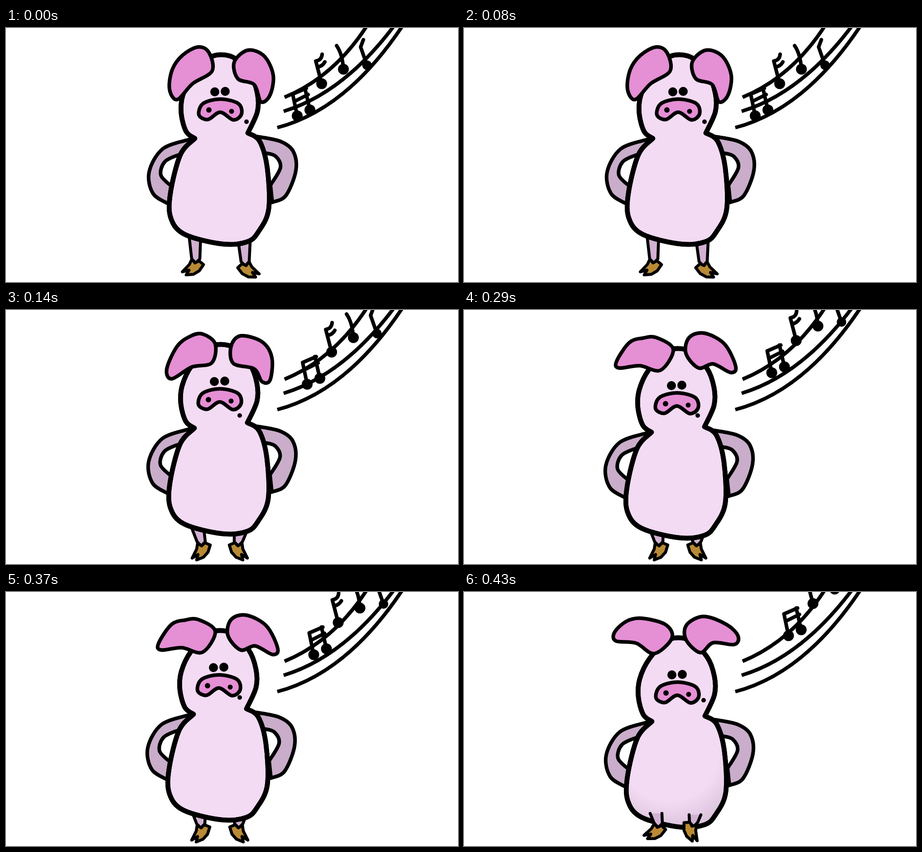
Recreate the animation shown at these times as an HTML page. Size 998 by 561 pixels, loop 570 ms.

```html
<!DOCTYPE html>
<html lang="en">
<head>
<meta charset="utf-8">
<title>Dancing pig</title>
<style>
html, body { margin: 0; width: 100%; height: 100%; overflow: hidden; background: #fff; }
svg { display: block; width: 100%; height: 100%; }
.ink { stroke: #000; stroke-width: 8; stroke-linejoin: round; stroke-linecap: round; }
.line { fill: none; }
.staff { stroke-linecap: butt; }
.pink { fill: #e58fd5; }
.skin { fill: #f3dbf3; }
.bold { stroke-width: 10.5; }
.arm { fill: #c9adca; }
.leg { fill: #d2b1d3; stroke-width: 6.5; }
.hoof { fill: #b98a35; stroke-width: 6.5; }
</style>
</head>
<body>
<svg id="stage" viewBox="0 0 998 561" preserveAspectRatio="none">
  <defs>
    <radialGradient id="shade" gradientUnits="userSpaceOnUse" cx="455" cy="310" r="170">
      <stop offset=".65" stop-color="#dcc4dd" stop-opacity="0"/>
      <stop offset="1" stop-color="#dcc4dd"/>
    </radialGradient>
  </defs>
</svg>
<script>
// Smooth curve through "x,y x,y ..." points.
function curve(text, closed) {
  const p = text.trim().split(/\s+/).map(s => s.split(',').map(Number));
  const n = p.length;
  const at = i => closed ? p[(i + n) % n] : p[Math.max(0, Math.min(n - 1, i))];
  let d = 'M' + p[0];
  for (let i = 0; i < (closed ? n : n - 1); i++) {
    const [a, b, c, e] = [at(i - 1), at(i), at(i + 1), at(i + 2)];
    const c1 = b.map((v, k) => (v + (c[k] - a[k]) / 6).toFixed(1));
    const c2 = c.map((v, k) => (v - (e[k] - b[k]) / 6).toFixed(1));
    d += `C${c1} ${c2} ${c}`;
  }
  return d + (closed ? 'Z' : '');
}
// Two curves joined end to end, with a corner at each joint.
const join = (a, b) => curve(a) + curve(b).replace('M', 'L');
const path = (d, cls, extra = '') => `<path d="${d}" class="ink ${cls}" ${extra}/>`;
const blob = (pts, cls) => path(curve(pts, true), cls);
const line = (d, cls = '') => path(d, 'line ' + cls);
const dot = (x, y, r) => `<circle cx="${x}" cy="${y}" r="${r}"/>`;
const group = (transform, body) => `<g transform="${transform}">${body}</g>`;
const shift = ([x, y], body) => group(`translate(${x} ${y})`, body);

const head = `417,244 398,229 387,190 390,150 411,106 452,64 500,64 539,102 555,145
  555,185 534,232`;
const torso = `534,232 560,250 577,310 580,400 558,449 533,472 478,477 395,456 364,420
  363,365 385,280 417,244`;

const arms =
  path(join('405,246 346,267 316,318 325,366 362,390', '366,350 342,325 351,295 384,279'), 'arm') +
  path(join('556,240 605,250 634,272 640,315 618,370 588,385',
    '584,347 606,308 595,283 572,276'), 'arm');

function body(shaded) {
  const d = join(head, torso);
  const shade = shaded ? `<path d="${curve(torso)}" fill="url(#shade)"/>` : '';
  return path(d, 'skin bold') + shade + line(d, 'bold');
}

const face = dot(461, 141, 10) + dot(484, 140, 10) +
  blob('473,157 513,167 520,190 502,203 473,186 446,202 426,192 435,167', 'pink') +
  dot(448, 181, 6) + dot(498, 184, 5.5);

// Tapered leg with a pointed end.
function leg([hx, hy], [x, y]) {
  return path(`M${hx - 13} ${hy}L${x - 9} ${y}L${x} ${y + 9}L${x + 9} ${y}L${hx + 13} ${hy}`, 'leg');
}
// Cloven hoof below the ankle; side -1 mirrors it.
function hoof([x, y], side, turn) {
  const d = 'M-8 3L-10 16L-20 36L-7 28L-10 40L5 34L15 23L20 7L8 2L1 9Z';
  return group(`translate(${x} ${y}) scale(${side} 1) rotate(${turn})`, path(d, 'hoof'));
}
const foot = ({ hip, ankle, turn }, side) => leg(hip, ankle) + hoof(ankle, side, turn);

const staff = ['M615 153Q724 108 797-5', 'M613 184Q745 144 857-5', 'M599 220Q752 180 875-4']
  .map(d => line(d, 'staff')).join('');

const note = (x, y, stem, r = 12) => dot(x, y, r) + line(`M${x} ${y}${stem}`);
const notes =
  note(643, 194, 'L633 146L663 133') + note(671, 181, 'L660 133M639 161L667 147') +
  note(697, 123, 'L684 73Q697 71 698 58M689 86Q699 84 704 75') +
  note(745, 91, 'Q743 58 730 39') + note(797, 82, 'L783 42L789 26', 10.5);

const poses = [
  { ms: 140, body: [0, 0], notes: [0, 0], mole: [531, 207],
    ears: ['424,42 448,54 455,95 412,123 378,158 361,135 367,92 390,60',
      '534,49 570,62 590,104 583,148 563,163 548,125 512,112 504,75'],
    left: { hip: [417, 458], ankle: [419, 510], turn: 17 },
    right: { hip: [526, 473], ankle: [528, 516], turn: 20 } },
  { ms: 150, body: [-1, 17], notes: [22, -30], mole: [516, 233],
    ears: ['434,53 462,75 454,117 410,126 366,152 355,130 378,80 407,58',
      '518,57 565,70 587,105 583,155 565,158 548,130 502,118 497,80'],
    left: { hip: [424, 484], ankle: [431, 512], turn: 0 },
    right: { hip: [517, 493], ankle: [513, 512], turn: 0 } },
  { ms: 140, body: [-3, 26], notes: [36.5, -55.5], mole: [516, 233],
    ears: ['425,61 462,87 434,133 388,123 342,128 337,113 365,72 395,62',
      '530,51 575,75 600,125 588,138 550,119 518,128 490,96 497,61'],
    left: { hip: [427, 494], ankle: [430, 512], turn: 0 },
    right: { hip: [515, 499], ankle: [514, 512], turn: 0 } },
  { ms: 140, body: [-2, 42], notes: [73.5, -97.5], mole: [529, 239], seated: true,
    ears: ['393,58 445,72 459,102 420,136 380,113 335,108 333,88 360,64',
      '530,54 580,72 605,97 597,116 550,112 522,134 490,105 492,72'],
    left: { hip: [424, 489], ankle: [429, 511], turn: 21 },
    right: { hip: [510, 492], ankle: [507, 509], turn: -18 } }
];

function draw(p) {
  const feet = foot(p.left, 1) + foot(p.right, -1);
  const trunk = shift(p.body, body(p.seated));
  const pig = shift(p.body, arms) + (p.seated ? trunk + feet : feet + trunk) +
    p.ears.map(e => blob(e, 'pink')).join('') + shift(p.body, face) + dot(...p.mole, 5);
  return `<g class="pose">${pig}${staff}${shift(p.notes, notes)}</g>`;
}

const stage = document.getElementById('stage');
stage.insertAdjacentHTML('beforeend', poses.map(draw).join(''));
const groups = [...stage.querySelectorAll('.pose')];
const total = poses.reduce((sum, p) => sum + p.ms, 0);
const start = performance.now();

function tick() {
  let t = (performance.now() - start) % total, now = 0;
  while (t >= poses[now].ms) t -= poses[now++].ms;
  groups.forEach((g, i) => g.style.display = i === now ? '' : 'none');
  requestAnimationFrame(tick);
}
tick();
</script>
</body>
</html>
```
